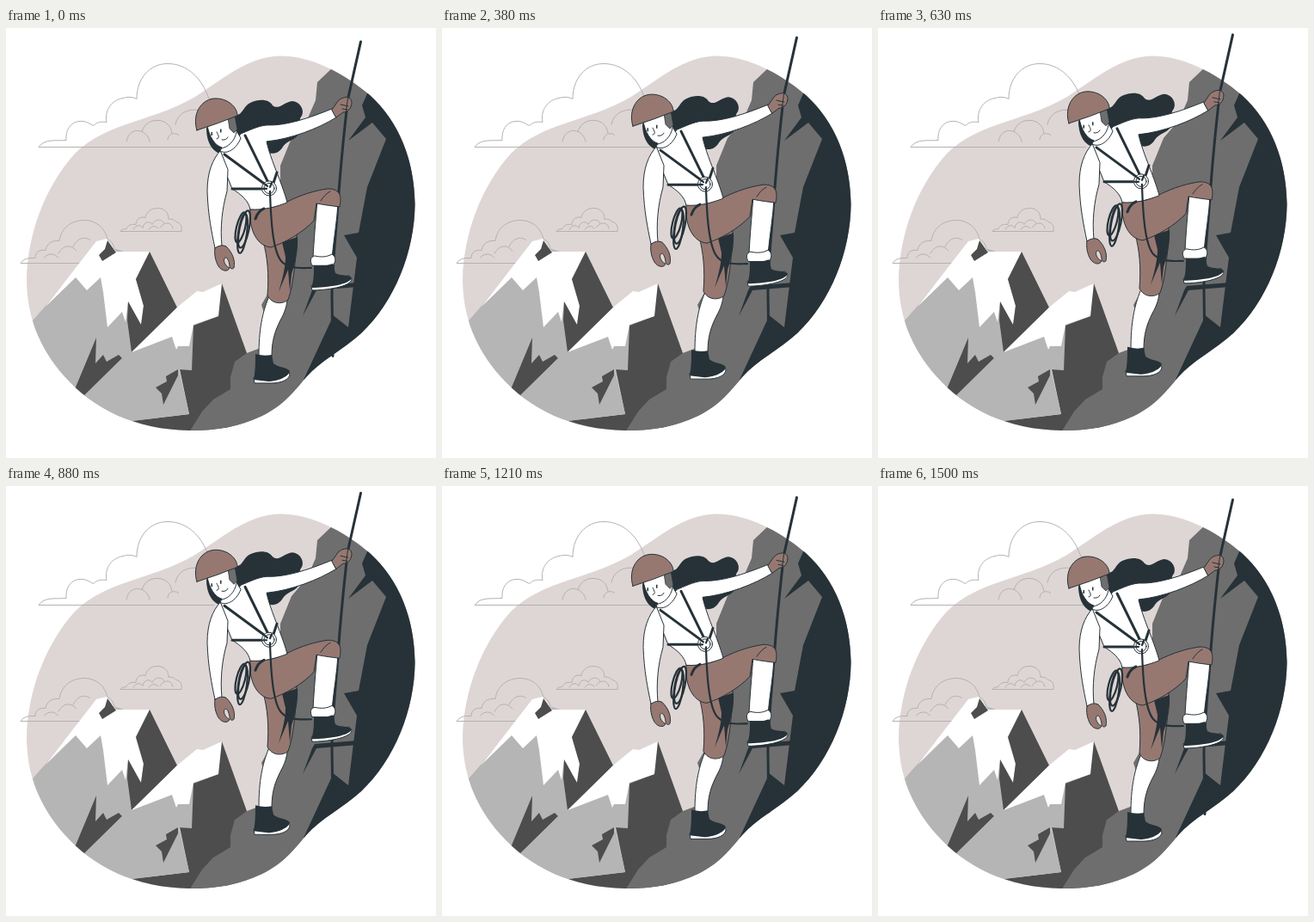
Write an HTML page that moves like this. It is 500 px wide and 500 px high and loops after 1540 ms.

```html
<!DOCTYPE html>
<html lang="en">
<head>
<meta charset="utf-8">
<title>Climber</title>
<style>
html, body { margin: 0; width: 100%; height: 100%; overflow: hidden; background: #fff; }
svg { display: block; width: 100vw; height: 100vh; }
.dark { fill: #263238; }
.rock { fill: #6e6e6e; }
.shade { fill: #4d4d4d; }
.stone { fill: #b5b5b5; }
.snow { fill: #fff; }
.cloud { fill: none; stroke: #b4b1b1; stroke-width: 1; }
.skin, .cloth { stroke: #263238; stroke-width: 1; stroke-linejoin: round; stroke-linecap: round; }
.skin { fill: #fff; }
.cloth { fill: #967871; }
.line { fill: none; stroke: #263238; stroke-width: 1; stroke-linecap: round; stroke-linejoin: round; }
.strap { stroke-width: 3; }
.thin { stroke-width: 2.2; }
</style>
</head>
<body>
<svg viewBox="0 0 500 500">
  <defs>
    <path id="blob" d="M220 80C250 61 281 33 318 32.5C352 32 390 50 423 78C458 110 475 155 475.5 205C475 260 452 318 413 355C392 374 367 386 349 406C332 427 320 440 298 451C270 464 245 468 213 468C152 467 102 444 67 404C39 372 24 335 24 292C25 240 45 185 80 146C118 109 165 111 220 80Z"/>
    <clipPath id="clip"><use href="#blob"/></clipPath>
  </defs>
  <use href="#blob" fill="#ded6d5"/>

  <g class="cloud" transform="translate(0 .5)">
    <path d="M242 138H38C45 128 57 131 70 130C69 118 75 109 85 108C94 107 98 112 102 113C105 109 111 108 117 109C114 94 124 83 136 81C143 79 148 80 152 82C152 58 167 41 188 41C211 41 228 58 236 82C244 80 250 84 252 92"/>
    <path d="M140 132C142 120 151 117 158 120C165 123 167 130 167 132M158 120C161 110 170 106 178 107C187 108 192 114 193 122M188 130C188 123 195 120 201 124M197 112C199 99 211 93 224 95"/>
    <path d="M100 273H17C22 266 29 267 34 267C34 260 39 257 46 258C47 250 54 246 62 247C64 232 76 223 91 223C105 223 115 232 118 245C123 247 126 252 126 258"/>
    <path d="M44 267C50 260 57 262 61 267M61 262C67 250 77 252 82 259M78 254C83 243 92 242 98 246"/>
    <path d="M133 236H204C205 230 203 226 198 225C195 222 191 221 189 222C189 213 183 209 176 209C168 209 163 214 162 220C156 218 151 222 151 228C144 227 141 230 140 233C137 233 134 234 133 236"/>
    <path d="M148 234C151 228 156 228 159 232C160 225 167 223 170 228C173 221 182 221 184 227M166 234C169 229 175 229 177 233M179 232C184 224 193 225 194 233"/>
  </g>

  <g clip-path="url(#clip)">
    <path class="stone" d="M10 364L47 322L105 250L170 270L190 400L150 480H20Z"/>
    <path class="snow" d="M46 324L105 248L117 245L128 260L167 260L151 292L160 323L157 345L142 318L139 342L135 330L118 348L113 307L110 290L94 305L81 290Z"/>
    <path class="shade" d="M118 247L128 261L112 271L108 264L115 257ZM167 260L199 325L190 336L146 377L141 340L142 318L157 345L160 323L151 292Z"/>
    <path class="shade" d="M105 360L80 420L91 428L135 384L131 380L117 388L113 380L104 390Z"/>
    <path class="shade" d="M251 297L285 392L270 480H130L146 457L213 449L190 340Z"/>
    <path class="stone" d="M146 377L200 324L247 335L218 346L216 398L201 397L213 449L146 457L105 442L91 427L135 384Z"/>
    <path class="snow" d="M146 377L200 324L222 306L229 307L251 297L247 335L218 345L213 370L200 370L198 374L193 359Z"/>
    <path class="shade" d="M200 397L186 405L187 411L174 418L181 425L183 438L200 404Z"/>
    <path class="rock" d="M382 44L362 63L360 84L350 107L332 128L319 160V250L305 308L297 322L303 340L296 372L280 378L266 388L261 406V420L241 432L228 446L213 470L211 480H400L480 300V90Z"/>
    <path class="dark" d="M421 74L414 90L418 104L398 131L426 110L442 129L420 185L410 238L393 241L408 267L398 348L379 333L378 340L346 409L420 400L490 300V80Z"/>
    <path class="dark" d="M345 335L356 305L359 300L409 296V301L361 305Z"/>
  </g>

  <g id="climber">
    <!-- hair and rope -->
    <path class="dark" d="M264 99C274 106 275 91 284 87C295 82 306 83 310 90C317 96 323 86 333 85C343 86 347 96 344 102C338 109 346 114 342 121C337 131 327 130 322 138C317 147 306 150 296 138L260 127Z"/>
    <path class="dark" d="M233 116C233 133 240 146 254 147L264 138L244 116Z"/>
    <path class="line strap" d="M412.5 16L397.500 83C393 122 389 160 386 205C383 245 379 280 379 312L380 381.500"/>

    <!-- standing leg -->
    <path class="skin" d="M305 314C298 332 294 350 294 382H309C309 363 313 352 319 340C324 331 327 323 327 314Z"/>
    <path class="cloth" d="M299 248C304 266 306 286 304 311C309 321 321 322 328 316C334 300 337 272 338 240Z"/>
    <path class="dark" d="M321 249L339 243C340 260 336 274 332 286L330 306L328 281L317 307C322 290 325 277 325 266Z"/>
    <path class="skin" d="M288 407L289 413H309C320 413 330 409 330 402L326 398Z"/>
    <path class="dark" d="M290 379Q300 382 309 380L311 390C316 395 327 394 330 399C329 406 314 411 305 411L288 409C290 398 290 390 290 379Z"/>

    <!-- raised leg -->
    <path class="skin" d="M362 200C360 226 358 246 357 268H379C381 246 385 224 386 204Z"/>
    <path class="cloth" d="M284 211C294 210 306 212 325 203C345 193 360 189 374 187C387 187 391 193 388 208C380 207 371 206 361 204L358 224C345 238 324 250 308 255C293 254 282 236 284 211Z"/>
    <path class="line" d="M377 190C373 192 369 196 366 201"/>
    <path class="skin" d="M356 276C353 271 354 266 359 265C367 267 374 266 379 263C384 266 384 272 380 276Z"/>
    <path class="skin" d="M355 300L356 305C372 305 401 301 402 292L399 288Z"/>
    <path class="dark" d="M358 276Q370 278 380 274L383 285C390 289 400 286 402 291C399 298 375 302 355 302C358 294 358 286 358 276Z"/>

    <!-- raised arm and torso -->
    <path class="skin" d="M249 141C258 140 267 133 273 123C281 120 292 114 303 113C325 114 352 105 379 94L384 104C363 117 332 129 303 132C306 146 313 163 318 176C322 187 325 195 327 203C314 208 300 212 284 211C282 201 274 194 263 187L251 158Z"/>
    <path class="cloth" d="M379 95L386 85C392 79 401 79 402 86C402 94 397 98 392 98L384 104Z"/>
    <path class="line" d="M389 89L398 91M391 94L397 95M397.500 82L395.500 97"/>

    <!-- lowered arm -->
    <path class="skin" d="M249 143C240 153 234 168 234 190C235 218 239 237 243 256L251 254C249 232 251 211 257 190L258 165Z"/>
    <path class="cloth" d="M243 256Q250 251 256 254C263 261 267 270 265 279C263 281 260 280 260 276C259 269 256 265 254 268C252 273 257 278 260 279C258 284 251 283 247 277C243 270 242 262 243 256Z"/>

    <!-- head -->
    <path class="skin" d="M234 113C236 126 243 137 251 139L249 143C258 148 269 139 273 128L267 118L265 101Z"/>
    <path class="line" d="M250 140C258 139 266 132 268 121M245 121C247 125 249 128 245 129M251 130Q256 131 258 127"/>
    <path class="dark" d="M238.500 121h1.500v4h-1.500zM249 117.500h1.500v4h-1.500z"/>
    <path d="M258 104L266 101L269 118L265 122L260 117Z" fill="#6e6e6e" stroke="#263238" stroke-width=".8"/>
    <path class="cloth" d="M222 119C216 100 227 82 244 82C258 82 269 92 269 102Q247 111 222 119Z"/>

    <!-- harness -->
    <path class="line strap" d="M254 147L303 183M278 125L305 180M263 187H298M311 180L315 168"/>
    <path class="line thin" d="M307 192C308 222 310 259 320 271C329 281 343 279 355 279"/>
    <circle class="skin" cx="306" cy="186.500" r="8.500"/>
    <circle class="line" cx="306" cy="186.500" r="6"/>
    <path class="line thin" d="M300 181L304 184M309 180L307 185M299 187H303M307 190V194"/>
    <path class="line strap" d="M290 222C292 216 295 212 300 210"/>
    <g class="line thin">
      <ellipse cx="277" cy="234" rx="5.500" ry="22" transform="rotate(12 277 234)"/>
      <ellipse cx="275" cy="239" rx="5" ry="23" transform="rotate(8 275 239)"/>
      <ellipse cx="273" cy="232" rx="5" ry="18" transform="rotate(14 273 232)"/>
    </g>
  </g>
</svg>
<script>
const LOOP = 1540, RISE = 8.5, LEAD = 40;
const climber = document.getElementById("climber");

function draw(ms) {
  const turn = 2 * Math.PI * (ms % LOOP + LEAD) / LOOP;
  const y = -RISE * (1 - Math.cos(turn)) / 2;
  climber.setAttribute("transform", `translate(0 ${y.toFixed(2)})`);
}

let start;
function tick(now) {
  start ??= now;
  draw(now - start);
  requestAnimationFrame(tick);
}
draw(0);
requestAnimationFrame(tick);
</script>
</body>
</html>
```
